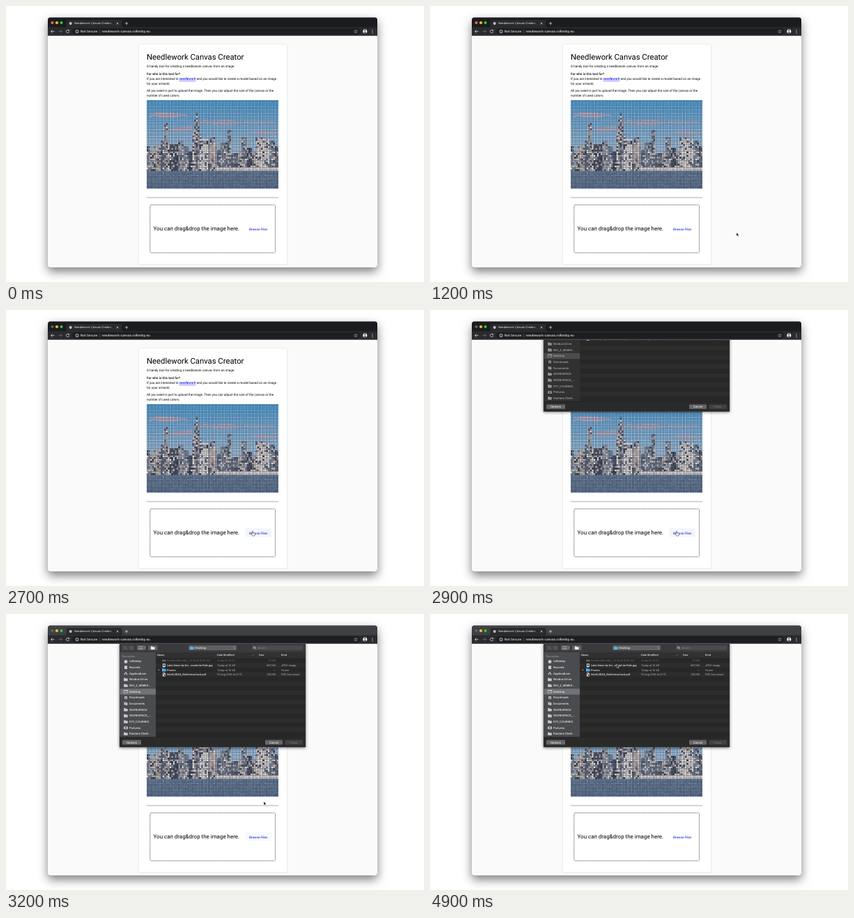
These frames come from a looping animation (600 px wide and 396 px high, 5 s). An HTML page:

```html
<!DOCTYPE html>
<html lang="en">
<head>
<meta charset="utf-8">
<title>Needlework Canvas Creator</title>
<style>
html, body { margin: 0; width: 100%; height: 100%; overflow: hidden; background: #fff; }
svg { display: block; width: 600px; height: 396px; }
text { white-space: pre; font-family: Roboto, sans-serif; text-rendering: geometricPrecision; }
.ui text { font-family: Inter, sans-serif; fill: #f0f0f0; }
.line { fill: none; stroke: #e2e3e5; stroke-width: .7; }
.window { filter: drop-shadow(0 0 .6px rgba(0,0,0,.5)) drop-shadow(0 6.5px 7px rgba(0,0,0,.5)); }
.card { filter: drop-shadow(0 .5px .8px rgba(0,0,0,.15)); }
.panel { filter: drop-shadow(0 1px 2px rgba(0,0,0,.55)); }
</style>
</head>
<body>
<svg id="stage" viewBox="0 0 600 396"></svg>
<script>
const box = (x, y, w, h, fill, more = '') =>
  `<rect x="${x}" y="${y}" width="${w}" height="${h}" fill="${fill}" ${more}/>`;
const dot = (x, y, r, fill, more = '') => `<circle cx="${x}" cy="${y}" r="${r}" fill="${fill}" ${more}/>`;
const text = (x, y, size, str, more = '') => `<text x="${x}" y="${y}" font-size="${size}" ${more}>${str}</text>`;
const line = (d, more = '') => `<path class="line" d="${d}" ${more}/>`;
const shape = (d, fill, more = '') => `<path d="${d}" fill="${fill}" ${more}/>`;
const tint = color => `style="fill:${color}"`;
const folder = (x, y, fill) => shape(`M${x} ${y}h2l.7 .8h2.8v3.6h-5.5z`, fill);
const medium = 'font-weight="500"';

let seed = 11;
const random = () => (seed = seed * 16807 % 2147483647) / 2147483647;

// Stitched skyline: sky, clouds, towers and water on a 75 x 50 grid
function mosaic() {
  const cols = 75, rows = 50, cw = 189 / cols, ch = 127 / rows, shore = 40;
  const walls = [[66, 72, 90], [128, 138, 158], [208, 190, 180], [234, 226, 222], [98, 106, 124], [176, 168, 172]];
  const tops = [], base = [];
  for (let c = 0; c < cols;) {
    const width = 2 + random() * 4 | 0, top = 22 + random() * 9 | 0, wall = random() * 6 | 0;
    for (let i = 0; i < width && c < cols; i++, c++) { tops[c] = top; base[c] = wall; }
  }
  // first column, width, top row, wall
  const towers = [[10, 2, 13, 5], [26, 5, 19, 3], [27, 3, 11, 5], [28, 1, 7, 4], [46, 2, 17, 4],
    [36, 3, 21, 2], [54, 3, 21, 1], [62, 4, 21, 3], [70, 3, 23, 1], [18, 3, 23, 5]];
  for (const [c, w, top, wall] of towers)
    for (let i = c; i < c + w; i++) { tops[i] = top; base[i] = wall; }
  // centre column, row, half width, half height
  const clouds = [[11, 8, 12, 1.6], [41, 12, 14, 1.3], [64, 12, 9, 1], [20, 16, 13, 1.2], [66, 18, 9, 1.2]];

  let out = box(202, 135, 189, 127, '#38424f');
  for (let r = 0; r < rows; r++) for (let c = 0; c < cols; c++) {
    let color, jitter = 8;
    if (r >= shore) {
      color = [104, 126, 156].map(v => v - (r - shore) * .8);
      jitter = 22;
    } else if (r >= shore - 2 && c > 38) {
      color = [232, 220, 216];
      jitter = 40;
    } else if (r >= tops[c]) {
      color = walls[random() < .5 ? base[c] : random() * 6 | 0];
      jitter = 36;
    } else {
      const k = Math.min(1, r / 27);
      color = [88 + 84 * k, 168 + 36 * k, 226 + 6 * k];
      if (clouds.some(([x, y, w, h]) => ((c - x) / w) ** 2 + ((r - y) / h) ** 2 < .5 + random() * .6))
        color = [190, 182, 204];
    }
    const shift = (random() - .5) * jitter;
    out += box((202.2 + c * cw).toFixed(2), (135.2 + r * ch).toFixed(2), 2.14, 2.16,
      `rgb(${color.map(v => Math.round(v + shift))})`);
  }
  return out;
}

function browser() {
  const nav = line('M69.5 36.5h-5m2.2-2.2l-2.2 2.2 2.2 2.2')
    + line('M75.5 36.5h5m-2.2-2.2l2.2 2.2-2.2 2.2', 'style="stroke:#77797d"')
    + line('M90.4 35.2a2.2 2.2 0 1 0 .3 2M90.7 34v1.7h-1.7');
  return `<g class="window">${box(60, 16.5, 473, 358.5, '#fafafa', 'rx="3.5"')}</g>
  <g class="ui">
    <path id="frame" d="M60 31v-11a3.5 3.5 0 0 1 3.5-3.5h466a3.5 3.5 0 0 1 3.5 3.5v11z"/>
    ${dot(66.5, 24, 2.1, '#ff5f57', 'id="close"')}${dot(73, 24, 2.1, '#febc2e')}${dot(79.5, 24, 2.1, '#28c840')}
    ${shape('M84 31q2.5 0 2.5-2.5v-6q0-2.5 2.5-2.5h75q2.5 0 2.5 2.5v6q0 2.5 2.5 2.5z', '#2a2b2f')}
    ${box(60, 30.5, 473, 12.2, '#2a2b2f')}
    ${dot(92.7, 25, 2, '#c4c4c6')}${text(98, 26.4, 4, 'Needlework Canvas Creator')}
    ${line('M158.8 23.7l2.6 2.6m0-2.6l-2.6 2.6')}${line('M170.8 25h4.4m-2.2-2.2v4.4')}
    ${nav}
    ${box(95, 32.1, 413, 9, '#1d1e21', 'rx="4.5"')}
    ${dot(102, 36.6, 2.2, 'none', 'class="line"')}${line('M102 36.3v1.5m0-2.8v.6')}
    ${text(107, 38.2, 4.55, 'Not Secure', medium)}${line('M134.6 34.2v4.8', 'style="stroke:#6b6d70"')}
    ${text(137.5, 38.2, 4.5, 'needlework-canvas.rolfemby.eu', medium)}
    ${line('M502 34l.7 1.7 1.8.1-1.4 1.2.5 1.8-1.6-1-1.6 1 .5-1.8-1.4-1.2 1.8-.1z', 'style="stroke-width:.4"')}
    ${dot(515.3, 36.6, 3, '#f1f1f1')}${dot(515.3, 35.6, 1, '#2a2b2f')}${shape('M513.3 38.4q2-2 4 0-2 1.5-4 0z', '#2a2b2f')}
    ${[34.6, 36.6, 38.6].map(y => dot(526, y, .6, '#f0f0f0')).join('')}
  </g>`;
}

function page() {
  const copy = [
    [88.2, 'A handy tool for creating a needlework canvas from an image.'],
    [99.2, 'For who is this tool for?', medium],
    [106, 'If you are interested in <tspan fill="#0000ee" font-weight="500" text-decoration="underline">needlework</tspan> and you would like to create a model based on an image'],
    [112.6, 'for your artwork.'],
    [123, 'All you need is just to upload the image. Then you can adjust the size of the canvas or the'],
    [129.7, 'number of used colors.']];
  return box(191, 55, 212, 315, '#fff', 'class="card" rx="1"')
    + text(202, 76.7, 11.3, 'Needlework Canvas Creator')
    + copy.map(([y, str, more]) => text(202, y, 4.62, str, more)).join('')
    + mosaic()
    + box(202, 274.5, 189, .8, '#9a9a9a')
    + box(206.8, 285.3, 179.8, 68.8, 'none', 'rx="2" stroke="#444" stroke-width=".8" stroke-dasharray="1 .6"')
    + text(211.6, 322.3, 7.94, 'You can drag&amp;drop the image here.')
    + box(344, 313.4, 37, 12.2, '#f3f5fd', 'id="hover" rx="1.3"')
    + text(349, 321.5, 4.65, 'Browse Files', medium + tint('#2f3fd0'));
}

function sheet() {
  const places = ['rolfemby', 'Recents', 'Applications', 'Nimbus Drive', 'ING_3_SEMES...', 'Desktop', 'Downloads',
    'Documents', 'WORKSPACE', 'WORKSPACE_...', 'FIIT_COURSES', 'Pictures', 'Painters Shelf...'];
  const files = [
    ['Screen Recordin...9-10 at 10.50.24', 'Today at 10:50', '14 MB', ''],
    ['Lake Dawn by Ko...mund da Fells.jpg', 'Today at 10:49', '463 KB', 'JPEG image'],
    ['Photos', 'Today at 10:48', '--', 'Folder'],
    ['IntelliJIDEA_ReferenceCard.pdf', '10 Aug 2019 at 21:11', '149 KB', 'PDF Document']];
  const grey = '#c9cacc', s = 3.75;
  const icons = {
    0: y => shape(`M169 ${y}l3-2.4 3 2.4h-.8v2.4h-4.4v-2.4z`, grey),
    1: y => box(170, y - 2.3, 4, 4.6, grey, 'rx=".5"'),
    2: y => line(`M169.8 ${y + 2}l2.2-4.2 2.2 4.2m-4.4-1.4h4.6`),
    5: y => box(169.2, y - 2, 5.6, 3.8, 'none', `stroke="${grey}" stroke-width=".7"`) + box(169.2, y - 2, 5.6, 1.2, grey),
    6: y => dot(172, y, 2.2, grey) + line(`M172 ${y - 1.2}v2.2m-.9-.8l.9.9.9-.9`, 'style="stroke:#444"'),
    7: y => box(169.6, y - 2.2, 3.2, 4, grey) + box(171.4, y - 1.6, 3, 4, grey, 'stroke="#444" stroke-width=".3"'),
    11: y => box(169.2, y - 1.7, 5.6, 3.8, grey, 'rx=".5"') + dot(172, y + .2, 1.1, '#444')
  };
  const button = (x, y, w, h, fill) => box(x, y, w, h, fill, 'rx="1.2"');

  let out = box(163, 42, 267, 149, '#2b2b2c', 'class="panel"')
    + box(163, 42, 267, 13, '#3a3a3c') + box(163, 55, 52, 122, '', 'id="sidebar"')
    + box(163.6, 107.2, 51.4, 8.4, '', 'id="selected"') + box(215, 55, 215, 8, '#313132');
  for (let i = 0; i < 17; i++) out += box(215, 63.7 + i * 6.6, 215, 6.6, i % 2 ? '#2d2d2e' : '#272728');
  out += box(163, 176.6, 267, 14.4, '#2a2a2b') + box(163, 176.4, 267, .4, '#1c1c1c')
    + box(163, 42, 267, 149, 'none', 'stroke="#4a4b4d" stroke-width=".3"');

  // toolbar
  out += button(167, 45, 8.3, 7, '#4b4b4d') + button(175.8, 45, 8.3, 7, '#4b4b4d')
    + line('M171.8 46.9l-1.5 1.6 1.5 1.6M179.3 46.9l1.5 1.6-1.5 1.6', 'style="stroke:#858587"')
    + button(188, 45, 13, 7, '#606062') + line('M190.5 47h1.2m1 0h1.2m1 0h1.2m-5.6 2.8h1.2m1 0h1.2m1 0h1.2', 'style="stroke-width:1.2"')
    + line('M198.1 48l.8.8.8-.8', 'style="stroke-width:.4"')
    + button(204, 45, 13.5, 7, '#606062') + folder(208, 46.5, '#eee')
    + button(262, 45, 69, 7, '#606062') + folder(264, 46.5, '#56b4ee')
    + line('M327 47.8l.9-1 .9 1m-1.8 1.6l.9 1 .9-1', 'style="stroke-width:.5"')
    + button(353, 45, 73, 7, '#4b4b4d') + dot(356.6, 48.2, 1.2, 'none', 'class="line"') + line('M357.5 49.1l1.2 1.2');
  // footer
  [[167, 27, '#666668', 'Options'], [372, 25, '#666668', 'Cancel'], [400.5, 25.5, '#414143', 'Open']]
    .forEach(([x, w, fill, label]) => out += button(x, 180.8, w, 6.6, fill)
      + text(x + w / 2, 185.6, 4, label, `text-anchor="middle" ${medium} ${label == 'Open' ? tint('#77777a') : ''}`));

  let words = text(271, 50, 4.1, 'Desktop', medium) + text(360.5, 50, 4, 'Search', tint('#8c8c8e'))
    + text(166.5, 62, 3.7, 'Favourites', tint('#a5a6a8'));
  places.forEach((name, i) => {
    const y = 68 + i * 8.66;
    words += (icons[i] ? icons[i](y) : folder(169.2, y - 2.2, grey)) + text(177, y + 1.4, 4.1, name, medium);
  });
  [[217, 'Name'], [303, 'Date Modified'], [363, 'Size'], [395, 'Kind']].forEach(([x, name]) =>
    words += text(x, 60.4, 3.7, name, medium));
  words += line('M353.7 58.5l.9.9.9-.9', 'style="stroke-width:.4"')
    + line('M301 56.5v5.5M361 56.5v5.5M393 56.5v5.5', 'style="stroke:#4b4b4d;stroke-width:.4"');
  files.forEach(([name, date, size, kind], i) => {
    const y = 68.4 + i * 6.6, more = tint(i ? '#b9b9bb' : '#6c6c6e');
    words += text(231, y, s, name, medium + tint(i ? '#f0f0f0' : '#6c6c6e')) + text(303, y, s, date, more)
      + text(387, y, s, size, more + ' text-anchor="end"') + text(395, y, s, kind, more);
  });
  words += box(224, 65.5, 5.4, 2.8, '#626264') + box(224.9, 71.3, 3.8, 5, '#eee') + box(225.5, 72.2, 2.6, 2.6, '#555b55')
    + shape('M218.6 79l2 1.3-2 1.3z', '#a0a0a2') + folder(224, 78, '#4aaef0')
    + box(224.9, 84.4, 3.8, 5, '#eee') + box(225.3, 85, 2, 2, '#d9544a') + box(226.6, 87, 1.8, 1.6, '#333');
  return `<clipPath id="below"><rect x="150" y="42.7" width="300" height="300"/></clipPath>
    <g clip-path="url(#below)"><g id="sheet" class="ui">${out}<g id="words">${words}</g></g></g>`;
}

const $ = id => document.getElementById(id);
$('stage').innerHTML = browser() + page() + sheet() + `
  <path id="arrow" d="M0 0v5l1.2-1 .8 1.8 .9-.4-.8-1.7h1.5z" fill="#000" stroke="#fff" stroke-width=".45"/>
  <path id="hand" d="M-.6-2.4q.6-.7 1.1 0v2l2.4.6q.7.3.5 1.2l-.6 2.6h-3l-2.1-2.6q-.3-.8.5-.8l1.2.8z"
    fill="#fff" stroke="#111" stroke-width=".5"/>`;

// time, x, y of the pointer
const path = [[0, 515, 412], [100, 493, 391], [300, 463, 362], [600, 440, 347], [800, 440, 345], [1000, 440, 330],
  [1100, 440, 325], [1200, 440, 325], [1300, 413, 318], [1900, 385, 317], [2000, 379, 318], [2400, 354, 320],
  [3000, 354, 320], [3100, 364, 302], [3200, 370, 269], [3400, 326, 176], [3600, 277, 92], [3800, 268, 72], [5000, 268, 72]];

const clamp = v => Math.max(0, Math.min(1, v));

function pointer(t) {
  const i = path.findIndex(p => p[0] > t), [t0, x0, y0] = path[i - 1], [t1, x1, y1] = path[i];
  const k = (t - t0) / (t1 - t0);
  return [x0 + (x1 - x0) * k, y0 + (y1 - y0) * k];
}

const show = (id, on) => $(id).style.display = on ? '' : 'none';
const paint = (id, color) => $(id).setAttribute('fill', color);

function draw() {
  const t = Math.floor(performance.now() % 5000 / 100) * 100;
  const over = t >= 2000 && t < 3100, ready = t >= 3100;
  const move = `translate(${pointer(t)})`;
  $('arrow').setAttribute('transform', move);
  $('hand').setAttribute('transform', move);
  show('arrow', !over);
  show('hand', over);
  $('hover').style.opacity = t < 2000 ? 0 : 1 - clamp((t - 3000) / 500);
  paint('close', t >= 2600 ? '#5f6165' : '#ff5f57');
  paint('frame', t >= 3200 ? '#3f4145' : '#1b1c1f');

  const drop = Math.sin(clamp((t - 2700) / 400) * Math.PI / 2);
  show('sheet', drop > 0);
  $('sheet').setAttribute('transform', `translate(0 ${(drop - 1) * 155})`);
  paint('sidebar', ready ? '#4a4b4e' : '#313132');
  paint('selected', ready ? '#717276' : '#4c4c4e');
  $('words').style.opacity = ready ? 1 : .65;
  requestAnimationFrame(draw);
}
draw();
</script>
</body>
</html>
```
